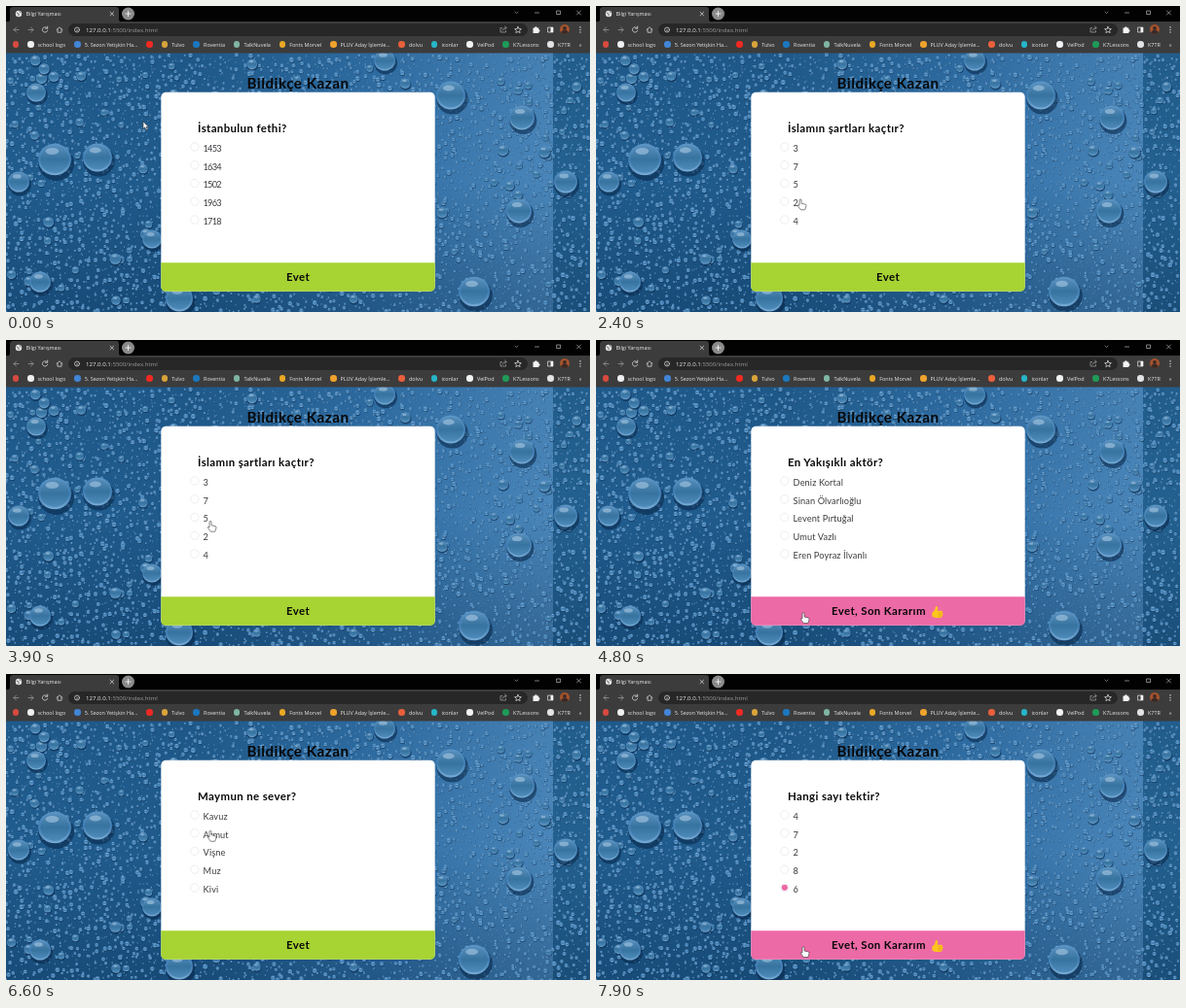
An HTML page with a canvas that plays this animation: 600x315 px, repeating every 8000 ms.

```html
<!DOCTYPE html>
<html lang="tr">
<head>
<meta charset="utf-8">
<title>Bilgi Yarışması</title>
<style>
  html, body { margin: 0; width: 100%; height: 100%; overflow: hidden; background: #1f5a8b; }
  canvas, svg { position: absolute; left: 0; top: 0; width: 600px; height: 315px; }
  text { white-space: pre; }
  .ui, #marks { font: 5.45px "Open Sans", "Noto Sans", sans-serif; fill: #eee; color: #e8e8e8; }
  .url { font-size: 6.1px; }
  .dim { fill: #9c9c9c; }
  .line { fill: none; stroke: #d4d4d4; stroke-width: .8; stroke-linecap: round; stroke-linejoin: round; }
  #marks {
    position: absolute; left: 6.5px; top: 34px; width: 585px; height: 11px;
    display: flex; justify-content: space-between; align-items: center; white-space: nowrap;
  }
  #marks span { display: flex; align-items: center; gap: 4px; }
  #marks i { width: 6.6px; height: 6.6px; border-radius: 50%; }
  .quiz { font: 700 11.4px Lato, "Open Sans", sans-serif; letter-spacing: .4px; fill: #080808; }
  .head { font-size: 15.2px; letter-spacing: .5px; }
  .answer { font-size: 9.2px; font-weight: 400; letter-spacing: .12px; fill: #3c3c40; }
  .num { letter-spacing: -.8px; }
  .cursor { fill: #fff; stroke: #333; stroke-width: .6; stroke-linejoin: round; }
</style>
</head>
<body>
<canvas id="wall" width="600" height="315"></canvas>
<svg viewBox="0 0 600 315" xmlns="http://www.w3.org/2000/svg">
  <!-- browser window -->
  <rect width="600" height="17" fill="#020202"/>
  <rect y="16" width="600" height="32.5" fill="#3c3c3c"/>
  <path d="M1 16.500q3 0 3-3V4q0-3 3-3h106q3 0 3 3v9.500q0 3 3 3z" fill="#3c3c3c"/>
  <circle cx="13" cy="8" r="3.2" fill="#e8e8e8"/>
  <path d="M11 7l2 1v2M14 5.500l1 1.500" class="line" style="stroke:#555"/>
  <text class="ui" x="20.500" y="10">Bilgi Yarışması</text>
  <circle cx="125.500" cy="8" r="6.500" fill="#8a8a8a"/>
  <g class="line">
    <path d="M107 6.200l3.600 3.600m0-3.600l-3.600 3.600"/>
    <path d="M123 8h5m-2.500-2.500v5" stroke="#fff"/>
    <path d="M523 6l1.500 1.500 1.500-1.500" stroke="#888"/>
    <path d="M543.500 7h4M566 5h3.500v3.500h-3.500zM586.500 5l4 4m0-4l-4 4" stroke-width=".6"/>
    <path d="M13 24.500H8m2.500-2.500l-2.500 2.500 2.500 2.500M23 24.500h5m-2.500-2.500l2.500 2.500-2.500 2.500" stroke="#999"/>
    <path d="M42.300 22.800a2.700 2.700 0 1 0 .4 2.500M42.700 21v2.200h-2.200"/>
    <path d="M52 24.500l3-2.700 3 2.700m-5-.7v3.400h4v-3.400"/>
  </g>
  <rect x="64" y="18" width="472" height="13" rx="6.500" fill="#272727"/>
  <g class="line">
    <circle cx="73" cy="24.500" r="2.500"/>
    <path d="M73 24.300v1.200"/>
    <path d="M509.500 22.500h-1.500v4.500h5.500v-1.500M510 25q.5-2.500 4-2.500m-1.500-1.500l1.700 1.500-1.700 1.500" stroke="#999"/>
    <path d="M526 21.300l1 2.200 2.400.2-1.800 1.600.5 2.300-2.100-1.200-2.100 1.200.5-2.300-1.800-1.600 2.400-.2z"/>
    <path d="M590 21.800v.1m0 2.500v.1m0 2.500v.1" stroke-width="1.400"/>
    <rect x="557" y="22" width="5" height="5"/>
  </g>
  <text class="ui url" x="82" y="26.700">127.0.0.1<tspan class="dim">:5500/index.html</tspan></text>
  <path d="M541.500 22.500h1.700a1.200 1.200 0 0 1 2.400 0h1.700v1.800a1.200 1.200 0 0 1 0 2.400v1.300h-5.800z" fill="#f4f4f4"/>
  <path d="M559.500 22h2.500v5h-2.500z" fill="#f4f4f4"/>
  <circle cx="574" cy="24" r="5" fill="#a5532c"/>
  <path d="M570.200 27.200q.8-2.400 3.800-2.400t3.800 2.400q-1.500 1.800-3.800 1.800t-3.800-1.800z" fill="#3a2a26"/>
  <circle cx="574" cy="23" r="1.900" fill="#3a2a26"/>

  <!-- quiz -->
  <text class="quiz head" x="300" y="85.300" text-anchor="middle">Bildikçe Kazan</text>
  <rect x="159.300" y="88.800" width="281.400" height="205" rx="5" fill="#fff"/>
  <path id="button" d="M159.300 264.200h281.400v24.600q0 5-5 5h-271.400q-5 0-5-5z"/>
  <text id="title" class="quiz" x="197" y="130.300"></text>
  <g id="answers"></g>
  <text id="idle" class="quiz" x="300" y="283.300" text-anchor="middle">Evet</text>
  <g id="final">
    <text class="quiz" x="242" y="283.300">Evet, Son Kararım</text>
    <path d="M345.300 280.500q2.700-1.200 3.500-5.500 .4-1.500 1.600-.9 1.500 1 .2 4.600h4.200q1.600.2 1.300 1.700 .9 1 .1 2 .4 1.200-.6 1.800 -.1 1.600-1.900 1.700h-4.400q-2.700-.2-4-1.400z" fill="#fcc51f"/>
    <path d="M351.500 280.800h4m-4 1.900h4m-4 1.700h3.500" stroke="#d98d18" stroke-width=".5"/>
  </g>
  <path id="arrow" class="cursor" d="M0 0v7.400l1.700-1.600 1.200 2.700 1.300-.6-1.200-2.600h2.300z"/>
  <path id="hand" class="cursor" d="M-1 .7Q-1-.3 0-.3T1 .7V4l4 .9q1.100.3 1 1.500l-.6 2.300-.7 1.800H.3L-2.500 6.700q-.6-1 .3-1.200l1.200.6z"/>
</svg>
<div id="marks"></div>
<script>
const $ = id => document.getElementById(id);
const LOOP = 8000, STEP = 100, GREEN = '#a7d333', PINK = '#ec6aa6';
const START = [141, 119], EXIT = [213, 281];
const rowY = i => 145 + i * 18.75;

// Bookmarks: icon colour and label
const bookmarks = {
  '#d84a3f': '', '#eef0f2': 'school logo', '#4285d6': '5. Sezon Yetişkin Ha...', '#f02a22': '',
  '#d8a33a': 'Tulvo', '#1b78c0': 'Roventia', '#7fb5a4': 'TalkNuvela', '#e9a825': 'Fonts Morvel',
  '#f0a32c': 'PLUV Aday İşlemle...', '#e8603c': 'dolvu', '#27b5c8': 'iconlar', '#f2f3f4': 'VelPod',
  '#1f9a58': 'K7Lessons', '#e2e3e5': 'K7TR'
};
for (const [color, label] of Object.entries(bookmarks)) {
  $('marks').innerHTML += `<span><i style="background:${color}"></i>${label}</span>`;
}
$('marks').append('»');

// The pointer reaches row `hover` at `look`, picks row `answer` at `pick`
// and rests on the button from `go` until the next question.
const quiz = [
  { at: 0, title: 'İstanbulun fethi?', list: '1453,1634,1502,1963,1718',
    hover: 0, look: 300, answer: 0, pick: 900, go: 1400, exit: [240, 269] },
  { at: 1700, title: 'İslamın şartları kaçtır?', list: '3,7,5,2,4',
    hover: 3, look: 1800, answer: 2, pick: 4000, go: 4500 },
  { at: 4800, title: 'En Yakışıklı aktör?',
    list: 'Deniz Kortal,Sinan Ölvarlıoğlu,Levent Pırtuğal,Umut Vazlı,Eren Poyraz İlvanlı',
    hover: 2, look: 5100, answer: 2, pick: 5300, go: 5400 },
  { at: 5700, title: 'Tavşan ne sever?', list: 'Karpuz,Elma,Ayva,Ceviz,Havuç',
    hover: 3, look: 5800, answer: 4, pick: 6100, go: 6200 },
  { at: 6400, title: 'Maymun ne sever?', list: 'Kavuz,Armut,Vişne,Muz,Kivi',
    hover: 1, look: 6600, answer: 3, pick: 7000, go: 7100 },
  { at: 7500, title: 'Hangi sayı tektir?', list: '4,7,2,8,6',
    hover: 4, look: 7600, answer: 4, pick: 7800, go: 7900 }
];

function add(parent, tag, attrs) {
  const el = document.createElementNS('http://www.w3.org/2000/svg', tag);
  for (const key in attrs) el.setAttribute(key, attrs[key]);
  return parent.appendChild(el);
}

const rows = [0, 1, 2, 3, 4].map(i => {
  const y = rowY(i), box = $('answers');
  add(box, 'circle', { cx: 193.8, cy: y, r: 4.2, fill: '#fff', stroke: '#e6e6e8', 'stroke-width': .7 });
  return {
    dot: add(box, 'circle', { cx: 193.8, cy: y - .2, r: 3.1, fill: PINK }),
    text: add(box, 'text', { x: 202.6, y: y + 4.9 })
  };
});

// Each move takes the last 300 ms before its arrival, or less if the previous stop is nearer
function pointer(t, q) {
  const onRow = i => [210, rowY(i) - 2];
  const stops = [[q.look, onRow(q.hover)], [q.pick, onRow(q.answer)], [q.go, q.exit || EXIT]];
  const before = quiz[quiz.indexOf(q) - 1];
  let [x, y] = before ? before.exit || EXIT : START;
  let prev = q.at;
  for (const [time, [nx, ny]] of stops) {
    const span = Math.min(300, time - prev);
    const k = Math.max(0, Math.min(1, (t - time + span) / span));
    x += (nx - x) * k;
    y += (ny - y) * k;
    prev = time;
  }
  return [x, y];
}

const show = (el, on) => el.setAttribute('visibility', on ? 'visible' : 'hidden');

function render(t) {
  const q = quiz.filter(item => item.at <= t).pop();
  const [x, y] = pointer(t, q);
  const onButton = y > 264;
  const onAnswer = x > 188 && y > 138 && y < 228;

  $('title').textContent = q.title;
  q.list.split(',').forEach((label, i) => {
    rows[i].text.textContent = label;
    rows[i].text.setAttribute('class', 'quiz answer' + (/^\d/.test(label) ? ' num' : ''));
    show(rows[i].dot, i === q.answer && t >= q.pick);
  });
  $('button').setAttribute('fill', onButton ? PINK : GREEN);
  show($('idle'), !onButton);
  show($('final'), onButton);
  for (const id of ['arrow', 'hand']) {
    $(id).setAttribute('transform', `translate(${x} ${y})`);
    show($(id), (id === 'hand') === (onButton || onAnswer));
  }
}

// Wallpaper: blue glass with seeded water drops
function paintWall() {
  const c = $('wall').getContext('2d');
  let seed = 7;
  const rnd = () => (seed = seed * 16807 % 2147483647) / 2147483647;
  const blend = (x0, y0, x1, y1, ...colors) => {
    const g = c.createLinearGradient(x0, y0, x1, y1);
    colors.forEach((color, i) => g.addColorStop(i / (colors.length - 1), color));
    return g;
  };
  const oval = (x, y, rx, ry, fill) => {
    c.fillStyle = fill;
    c.beginPath();
    c.ellipse(x, y, rx, ry, 0, 0, 7);
    c.fill();
  };
  const drop = (x, y, r) => {
    oval(x + r * .1, y + r * .25, r * 1.08, r * 1.05, 'rgba(8,40,75,.6)');
    oval(x, y, r, r * .96, blend(x, y - r, x, y + r, '#5e97c6', '#3f7db3', '#79add6'));
    if (r > 3) oval(x, y, r * .86, r * .82, blend(x, y - r, x, y + r, '#5d92bf', '#37739f', '#5390c0'));
    oval(x - r * .15, y - r * .5, r * .4, r * .2, 'rgba(200,225,243,.45)');
  };

  c.fillStyle = blend(0, 0, 562, 0, '#205c8e', '#1f5a8b', '#2f6da3', '#4a86ba');
  c.fillRect(0, 48, 562, 267);
  c.fillStyle = '#23608f';
  c.fillRect(562, 48, 38, 267);
  c.fillStyle = blend(0, 48, 0, 315, 'rgba(8,45,80,.05)', 'rgba(8,45,80,0)', 'rgba(8,45,80,.35)');
  c.fillRect(0, 48, 600, 267);

  const cell = 6;
  for (let y = 50; y < 318; y += cell) {
    for (let x = 0; x < 603; x += cell) {
      drop(x + cell * rnd(), y + cell * rnd(), .7 + 1.9 * rnd() ** 2);
    }
  }
  for (let i = 0; i < 110; i++) drop(rnd() * 600, 50 + rnd() * 265, 3 + 3 * rnd() ** 2);
  [
    [50, 158, 17], [94, 156, 15], [31, 89, 10], [13, 181, 11], [150, 240, 10], [35, 284, 11],
    [178, 301, 14], [389, 56, 11], [457, 92, 15], [530, 115, 13], [527, 211, 13], [481, 294, 16],
    [575, 181, 12]
  ].forEach(d => drop(...d));
}

paintWall();
let last = -1;
function tick(now) {
  const t = Math.floor(now % LOOP / STEP) * STEP;
  if (t !== last) render(last = t);
  requestAnimationFrame(tick);
}
render(0);
requestAnimationFrame(tick);
</script>
</body>
</html>
```
